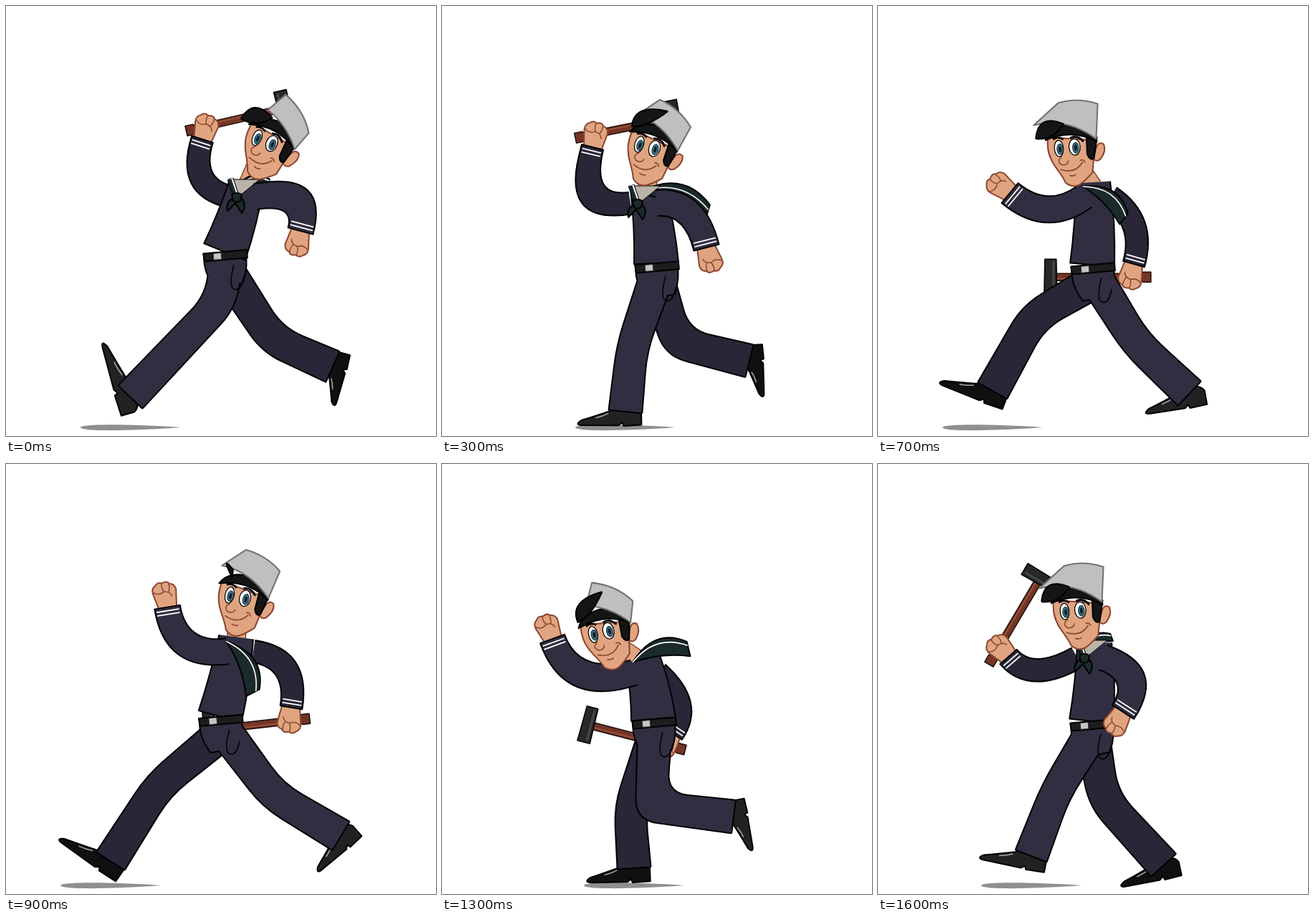
These frames come from a looping animation (600 by 600 pixels, 1700 ms). An HTML page with a canvas:

```html
<!DOCTYPE html>
<html lang="en">
<head>
<meta charset="utf-8">
<title>Marching sailor</title>
<style>
html, body { margin: 0; width: 100%; height: 100%; overflow: hidden; background: #fff; }
canvas { display: block; width: 100vw; height: 100vh; }
</style>
</head>
<body>
<canvas width="600" height="600"></canvas>
<script>
const ctx = document.querySelector('canvas').getContext('2d');
const FRAMES = 17, STEP = 100;
const CLOTH = '#302e40', CLOTH_FAR = '#282637', SCARF = '#1b2a2b', HAIR = '#151515';
const SKIN = '#e0a580', SKIN_LINE = '#8c4630';

// Key poses; everything else on the figure is derived from these joints.
// body: chest, waist   head: x, y, degrees, hat pull, curl lift   flap: tip
// arms: elbow, wrist   hammer: degrees   legs: knee, ankle, shoe degrees
const poses = [
  { frame: 0, body: [336, 246, 305, 343], head: [361, 195, 27, 0, 0], flap: [368, 247],
    farArm: [253, 252, 274, 186], hammer: [-13], nearArm: [427, 254, 411, 314],
    nearLeg: [300, 412, 174, 545, 74], farLeg: [372, 466, 455, 503, -75] },
  { frame: 3, body: [287, 255, 299, 359], head: [287, 203, 21, .4, 1], flap: [370, 290],
    farArm: [188, 287, 210, 197], hammer: [-11.5], nearArm: [352, 270, 369, 337],
    nearLeg: [265, 477, 256, 565, -1], farLeg: [328, 470, 428, 495, -93] },
  { frame: 5, body: [262, 276, 299, 365], head: [214, 246, -10, 0, 0], flap: [354, 244],
    farArm: [228, 362, 194, 335], hammer: [-54], nearArm: [286, 345, 267, 404],
    nearLeg: [289, 470, 322, 566, -2], farLeg: [325, 475, 384, 483, -100] },
  { frame: 7, body: [300, 246, 299, 361], head: [267, 204, 0, 1, 0], flap: [343, 297],
    farArm: [374, 300, 357, 360], hammer: [-180], nearArm: [236, 304, 184, 261],
    nearLeg: [360, 470, 434, 540, -10], farLeg: [217, 434, 160, 536, 21] },
  { frame: 11, body: [328, 246, 298, 346], head: [352, 195, 27, 0, 1], flap: [347, 322],
    farArm: [410, 264, 399, 324], hammer: [-171], nearArm: [236, 254, 262, 174],
    nearLeg: [362, 458, 470, 500, -75], farLeg: [232, 472, 184, 562, 24] },
  { frame: 13, body: [280, 271, 295, 356], head: [226, 241, -8, 0, 1], flap: [344, 258],
    farArm: [350, 335, 322, 376], hammer: [-165.5], nearArm: [180, 316, 154, 244],
    nearLeg: [292, 478, 406, 492, -101], farLeg: [262, 480, 268, 563, -2] },
  { frame: 16, body: [302, 250, 298, 359], head: [275, 211, 0, 1, 0], flap: [326, 242],
    farArm: [214, 306, 182, 269], hammer: [-59.4], nearArm: [377, 292, 342, 346],
    nearLeg: [248, 457, 214, 546, 11], farLeg: [315, 468, 398, 559, -12] }
];

// Cyclic Hermite interpolation of one part.
function sample(part, frame) {
  const n = poses.length, i = poses.findLastIndex(p => p.frame <= frame);
  const [[f0, a], [f1, b], [f2, c], [f3, d]] = [i - 1, i, i + 1, i + 2].map(k => {
    const p = poses[(k + n) % n];
    return [p.frame + FRAMES * Math.floor(k / n), p[part]];
  });
  const h = f2 - f1, t = (frame - f1) / h, u = 1 - t;
  return b.map((p, j) => {
    const m1 = (c[j] - a[j]) / (f2 - f0) * h, m2 = (d[j] - p) / (f3 - f1) * h;
    return u * u * (1 + 2 * t) * p + t * u * u * m1 + t * t * (3 - 2 * t) * c[j] - t * t * u * m2;
  });
}

const radians = degrees => degrees * Math.PI / 180;
const mix = (a, b, t) => a + (b - a) * t;
const clamp = (v, limit) => Math.max(-limit, Math.min(limit, v));
const add = ([x, y], [dx, dy], k = 1) => [x + dx * k, y + dy * k];
const mixPoint = (p, q, t) => [mix(p[0], q[0], t), mix(p[1], q[1], t)];
const turn = ([x, y], a) => [x * Math.cos(a) - y * Math.sin(a), x * Math.sin(a) + y * Math.cos(a)];
const normal = ([x]) => x;
function direction(p, q) {
  const len = Math.hypot(q[0] - p[0], q[1] - p[1]) || 1;
  return [(q[0] - p[0]) / len, (q[1] - p[1]) / len];
}
const across = (p, q) => turn(direction(p, q), Math.PI / 2);

function paint(fill, stroke = '#000', width = 2, path) {
  const args = path ? [new Path2D(path)] : [];
  ctx.lineWidth = width;
  if (fill) { ctx.fillStyle = fill; ctx.fill(...args); }
  if (stroke) { ctx.strokeStyle = stroke; ctx.stroke(...args); }
}
const draw = (path, fill, stroke, width) => paint(fill, stroke, width, path);

function within([x, y], angle, sx, sy, body) {
  ctx.save();
  ctx.translate(x, y);
  ctx.rotate(angle);
  ctx.scale(sx, sy);
  body();
  ctx.restore();
}

// Adds a tapered limb through three joints, its bend softened over r pixels.
function limb([a, b, c], [wa, wb, wc], r) {
  const n1 = across(a, b), n2 = across(b, c);
  const miter = 1 / Math.max(.5, 1 + n1[0] * n2[0] + n1[1] * n2[1]);
  const bend = [(n1[0] + n2[0]) * miter, (n1[1] + n2[1]) * miter];
  const side = s => [add(a, n1, s * wa), add(b, bend, s * wb), add(c, n2, s * wc)];
  const cut = (p, q) => add(p, direction(p, q), Math.min(r, Math.hypot(q[0] - p[0], q[1] - p[1])));
  const edge = ([p, q, e]) => {
    ctx.lineTo(...p);
    ctx.lineTo(...cut(q, p));
    ctx.quadraticCurveTo(...q, ...cut(q, e));
    ctx.lineTo(...e);
  };
  ctx.moveTo(...side(.5)[0]);
  edge(side(.5));
  edge(side(-.5).reverse());
}

function shadow(left) {
  const mid = left + 70, right = left + 140;
  draw(`M${left} 588C${left} 583 ${mid} 583 ${right} 588C${mid} 593 ${left} 594 ${left} 588`, '#8f8f8f', null);
}

function shoe(ankle, degrees, fill) {
  const angle = radians(degrees), length = 90 + 16 * Math.sin(angle);
  within(add(ankle, turn([22, 19], angle)), angle, length / 90, 1, () => {
    draw('M0 1L0 -18Q-4 -27 -18 -27Q-34 -26 -42 -20Q-60 -14 -84 -7Q-94 -1 -84 0L-32 1L-27 -3L-25 2Z', fill);
    draw('M-64 -10Q-54 -12 -46 -16', null, '#aaa', 1.5);
  });
}

function leg([kx, ky, ax, ay, degrees], waist, isNear) {
  const ankle = [ax, ay];
  shoe(ankle, degrees, isNear ? '#222' : '#101010');
  ctx.beginPath();
  limb([add(waist, [2, isNear ? 14 : 24]), [kx, ky], ankle], [46, 41, 45], 30);
  if (isNear) limb([waist, add(waist, [2, 24]), add(waist, [6, 46])], [56, 60, 38], 20);
  paint(null, '#000', 4);
  paint(isNear ? CLOTH : CLOTH_FAR, null);
  if (isNear) within(waist, 0, 1, 1, () => draw('M13 18Q5 48 13 52Q23 56 27 34', null, '#000', 1.5));
}

function torso([cx, cy], waist) {
  const chest = [cx, cy];
  ctx.beginPath();
  limb([chest, add(mixPoint(chest, waist, .5), [4, 0]), waist], [48, 56, 62], 60);
  paint(CLOTH);
  within(waist, radians(-5), 1, 1, () => {
    draw('M-30 0H31V11H-29Z', '#1d1d1e');
    draw('M-16 1h11v9h-11Z', '#c6c6c6', '#333', 1);
  });
}

function neck(head, chest) {
  for (const [color, width] of [[SKIN_LINE, 27], [SKIN, 24]])
    draw(`M${head}L${add(chest, [0, 6])}`, null, color, width);
}

function collar(chest) {
  within(chest, 0, 1, 1, () => {
    draw('M-20 -4L18 -4L-14 22Z', '#b9b3aa', '#000', 1);
    draw('M-23 -5L-14 22', null, '#000', 9);
    draw('M-22 -5L-13 22', null, '#fff', 5);
    draw('M-24 -4L-15 22', null, SCARF, 5);
    draw('M-19 22Q-30 28 -27 40L-16 29L-7 43Q1 30 -8 22Z', SCARF);
    draw('M-21 17Q-14 13 -7 17L-9 26Q-14 29 -19 26Z', SCARF);
  });
}

function flap(tip, chest) {
  const base = add(chest, [-14, 6]), up = across(tip, base);
  const length = Math.hypot(tip[0] - base[0], tip[1] - base[1]), mid = mixPoint(base, tip, .5);
  const bulge = k => add(mid, up, length * k), end = k => add(tip, up, length * k);
  draw(`M${base}Q${bulge(.5)} ${end(.13)}L${end(-.13)}Q${bulge(.06)} ${base}`, SCARF);
  draw(`M${base}Q${bulge(.39)} ${end(.06)}`, null, '#fff', 1.6);
}

// Arm with fist; returns where the fist is.
function arm([ex, ey, wx, wy], chest, reach, width, fill, held) {
  const elbow = [ex, ey], wrist = [wx, wy], along = direction(elbow, wrist), side = across(elbow, wrist);
  const shoulder = add(chest, [clamp((wx - chest[0]) / 2, reach), 20]);
  const fist = add(wrist, along, 19);
  held?.(fist);
  within(fist, Math.atan2(along[1], along[0]), 1, 1, () => {
    draw('M-20 -12L2 -17Q10 -18 13 -12Q18 -8 15 -2Q18 5 13 8Q12 15 4 16L-20 13Z', SKIN, SKIN_LINE);
    draw('M15 -3Q7 -4 3 -1M13 7Q6 8 2 5M4 -16Q-2 -10 3 -1Q2 8 -5 9', null, SKIN_LINE, 1.5);
  });
  ctx.beginPath();
  limb([shoulder, elbow, wrist], [width, width, width], 99);
  paint(fill);
  for (const back of [-5, -10]) {
    const p = add(wrist, along, back);
    draw(`M${add(p, side, width / 2 - 2)}L${add(p, side, 2 - width / 2)}`, null, '#fff', 1.8);
  }
}

function hammer(grip, degrees) {
  within(grip, radians(degrees), 1, 1, () => {
    draw('M-29 -7H-18L-16 -5H104V5H-16L-18 7H-29Z', '#743526', '#1d0d08', 1.5);
    draw('M-14 -2H102', null, '#96503c', 2);
    draw('M102 -25L120 -25L119 25L103 25Z', '#262829', '#000', 1.5);
    draw('M107 -22V22', null, '#44484a', 3);
  });
}

function eye(x, y, rx) {
  const oval = (dx, dy, a, b, fill, stroke) => {
    ctx.beginPath();
    ctx.ellipse(x + dx, y + dy, a, b, -.08, 0, 7);
    paint(fill, stroke, 1.2);
  };
  oval(0, 0, rx, 11, '#fff', '#000');
  oval(1.5, 1, 4, 7, '#3a7186', '#203c48');
  oval(1.5, 1, 1.8, 4, '#0d1a20', null);
}

function head([x, y, degrees, pull, lift]) {
  within([x, y], radians(degrees), 1.04, 1.04, () => {
    draw('M35 -2Q38 -16 46 -11Q50 -2 42 9Q37 14 32 9Z', SKIN, SKIN_LINE);
    draw('M-29 -20Q-30 -4 -26 6Q-23 14 -17 22Q-8 34 -5 41Q4 48 13 44Q22 38 31 27L35 -16Z', SKIN, SKIN_LINE);
    draw('M23 -20L24 3Q28 12 33 8L37 -20Z', HAIR);
    draw('M-32 -16Q-26 -36 8 -38Q34 -38 37 -14Q4 -32 -32 -16Z', HAIR);
    eye(-14, -5, 6);
    eye(7, -7, 7.5);
    draw('M-22 -17Q-15 -22 -8 -17M1 -19Q11 -24 19 -14', null, '#000', 2.6);
    draw('M-10 6Q-18 12 -10 17Q-2 18 -1 11', SKIN, SKIN_LINE, 1.5);
    draw('M-12 23Q8 30 18 13M14 11Q20 9 21 14M0 31Q5 33 9 30', null, SKIN_LINE, 1.6);
    const hatPoint = (ax, ay, bx, by) => mixPoint([ax, ay], [bx, by], pull);
    const back = hatPoint(38, -14, 36, -18), front = hatPoint(-18, -45, -48, -36);
    draw(`M${front}L${hatPoint(-6, -74, -15, -66)}Q${hatPoint(26, -66, 10, -74)} ${hatPoint(45, -42, 38, -65)}` +
      `L${back}Q${hatPoint(14, -38, -6, -48)} ${front}Z`, '#bfbfbf', '#737373');
    const curlPoint = (ax, ay, bx, by) => mixPoint([ax, ay], [bx, by], lift);
    const tip = curlPoint(-45, -18, 6, -60);
    draw(`M${tip}Q${curlPoint(-42, -52, -40, -54)} ${curlPoint(-8, -38, -32, -24)}` +
      `Q${curlPoint(-20, -16, -14, -28)} ${tip}`, HAIR);
  });
}

function render(frame) {
  const part = name => sample(name, frame);
  const body = part('body'), chest = body.slice(0, 2), waist = body.slice(2);
  const nearLeg = part('nearLeg'), farLeg = part('farLeg'), nearArm = part('nearArm'), headPose = part('head');
  const chestOpen = nearArm[2] > chest[0];
  const drawNearArm = () => arm(nearArm, chest, 12, 36, CLOTH);

  ctx.fillStyle = '#fff';
  ctx.fillRect(0, 0, 600, 600);
  ctx.lineJoin = 'round';
  shadow(Math.min(nearLeg[2], farLeg[2]) - 70);
  arm(part('farArm'), chest, 24, 31, CLOTH_FAR, fist => hammer(fist, part('hammer')[0]));
  leg(farLeg, waist, false);
  leg(nearLeg, waist, true);
  neck(headPose.slice(0, 2), chest);
  torso(chest, waist);
  if (!chestOpen) drawNearArm();
  flap(part('flap'), chest);
  if (chestOpen) collar(chest);
  head(headPose);
  if (chestOpen) drawNearArm();
}

function tick() {
  render(Math.floor(performance.now() / STEP) % FRAMES);
  requestAnimationFrame(tick);
}
tick();
</script>
</body>
</html>
```
